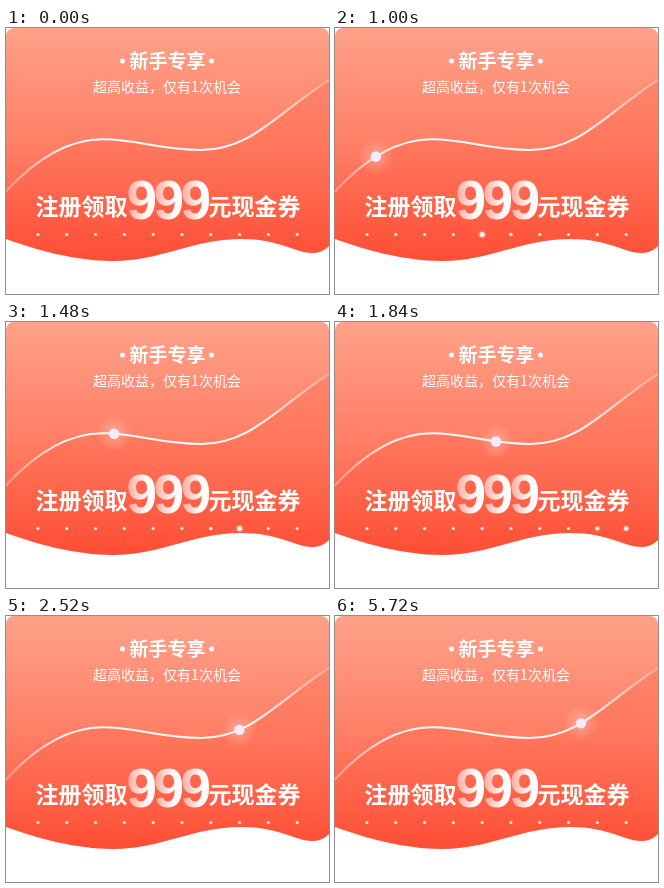
Write an HTML page with a canvas that moves like this. It is 323 by 266 pixels and loops after 5760 ms.

```html
<!DOCTYPE html>
<html lang="zh-CN">
<head>
<meta charset="utf-8">
<style>
html, body { margin: 0; width: 100%; height: 100%; overflow: hidden; background: #fff; }
canvas { display: block; }
</style>
</head>
<body>
<canvas id="stage" width="323" height="266"></canvas>
<script>
const W = 323, H = 266, LOOP = 5760;
const ctx = document.getElementById('stage').getContext('2d');
const SANS = '"Noto Sans CJK SC", "Noto Sans CJK", sans-serif';
const DIGITS = '"Liberation Sans", sans-serif';

const CARD = new Path2D('M0 8 A8 8 0 0 1 8 0 H315 A8 8 0 0 1 323 8 V218' +
  'C319 222 314 225 307 225 C288 225 275 211 235 211 C187 211 155 233 107 233 C70 233 30 222 0 211 Z');
const TRACK = 'M-15 181 C20 137 57 111.3 97 111.3 C130 111.3 155 122 195 122 C245 122 270 86 323 52';
const trackLine = new Path2D(TRACK);
const belowTrack = new Path2D(TRACK + ' V266 H-15 Z');
const track = document.createElementNS('http://www.w3.org/2000/svg', 'path');
track.setAttribute('d', TRACK);

// Distance along the track at which the ball comes to rest
let restLength = 200;
while (track.getPointAtLength(restLength).x < 246) restLength += 0.5;

const BALL = { start: 40, duration: 2840 };
const PULSE = { start: 15, step: 195, duration: 310 };
const DOTS = { count: 10, x: 32, gap: 28.8, y: 206.5 };

const white = a => `rgba(255,255,255,${a})`;
const clamp = v => Math.min(1, Math.max(0, v));

function gradient(x0, y0, x1, y1, stops) {
  const g = ctx.createLinearGradient(x0, y0, x1, y1);
  stops.forEach(([at, color]) => g.addColorStop(at, color));
  return g;
}

function disc(x, y, r, fill) {
  ctx.fillStyle = fill;
  ctx.beginPath();
  ctx.arc(x, y, r, 0, Math.PI * 2);
  ctx.fill();
}

function glow(x, y, r, alpha) {
  const g = ctx.createRadialGradient(x, y, 0, x, y, r);
  g.addColorStop(0, white(alpha));
  g.addColorStop(0.4, white(alpha * 0.6));
  g.addColorStop(1, white(0));
  disc(x, y, r, g);
}

function label(text, x, y, font, fill = '#fff') {
  ctx.font = font;
  ctx.fillStyle = fill;
  ctx.fillText(text, x, y);
}

function drawCard() {
  ctx.fillStyle = '#fff';
  ctx.fillRect(0, 0, W, H);
  ctx.fillStyle = gradient(0, 0, 0, 233, [[0, '#ffa189'], [0.5, '#ff7f66'], [1, '#ff4d35']]);
  ctx.fill(CARD);
  ctx.save();
  ctx.clip(CARD);
  ctx.fillStyle = gradient(0, 52, 0, 215, [[0, 'rgba(255,80,48,0.2)'], [1, 'rgba(255,80,48,0.1)']]);
  ctx.fill(belowTrack);
  ctx.restore();
  ctx.strokeStyle = gradient(0, 0, W, 0,
    [[0, white(0.3)], [0.2, white(0.95)], [0.75, white(0.95)], [1, white(0.3)]]);
  ctx.lineWidth = 2;
  ctx.stroke(trackLine);
}

function drawText() {
  ctx.textAlign = 'center';
  label('新手专享', 161.5, 39.5, `bold 19px ${SANS}`);
  label('超高收益，仅有1次机会', 161, 64, `14px ${SANS}`);
  disc(116.5, 33, 2.5, '#fff');
  disc(205.5, 33, 2.5, '#fff');

  ctx.textAlign = 'left';
  for (let i = 0; i < 3; i++) {
    const x = 120.5 + i * 27;
    const fade = gradient(x, 0, x + 29, 0, [[0, white(0.4)], [0.65, white(0.95)], [1, '#fff']]);
    label('9', x, 190.5, `bold 55px ${DIGITS}`, fade);
  }
  label('注册领取', 29.5, 186.5, `bold 23px ${SANS}`);
  label('元现金券', 202.5, 186.5, `bold 23px ${SANS}`);
}

function drawDots(t) {
  for (let i = 0; i < DOTS.count; i++) {
    const x = DOTS.x + i * DOTS.gap;
    const phase = clamp((t - PULSE.start - i * PULSE.step) / PULSE.duration);
    const lit = Math.sin(Math.PI * phase);
    if (lit > 0.01) glow(x, DOTS.y, 3 + 2.5 * lit, 0.5 * lit);
    disc(x, DOTS.y, 1.5 + 1.2 * lit, white(0.9));
  }
}

function drawBall(t) {
  const p = clamp((t - BALL.start) / BALL.duration);
  const sine = (1 - Math.cos(Math.PI * p)) / 2;
  const eased = 0.88 * sine + 0.12 * p;
  const { x, y } = track.getPointAtLength(restLength * eased);
  glow(x, y, 18, 0.3);
  disc(x, y, 5.2, '#f3ecfb');
}

function frame(now) {
  const t = now % LOOP;
  drawCard();
  ctx.save();
  ctx.clip(CARD);
  if (t >= BALL.start) drawBall(t);
  ctx.restore();
  drawText();
  drawDots(t);
  requestAnimationFrame(frame);
}

requestAnimationFrame(frame);
</script>
</body>
</html>
```
